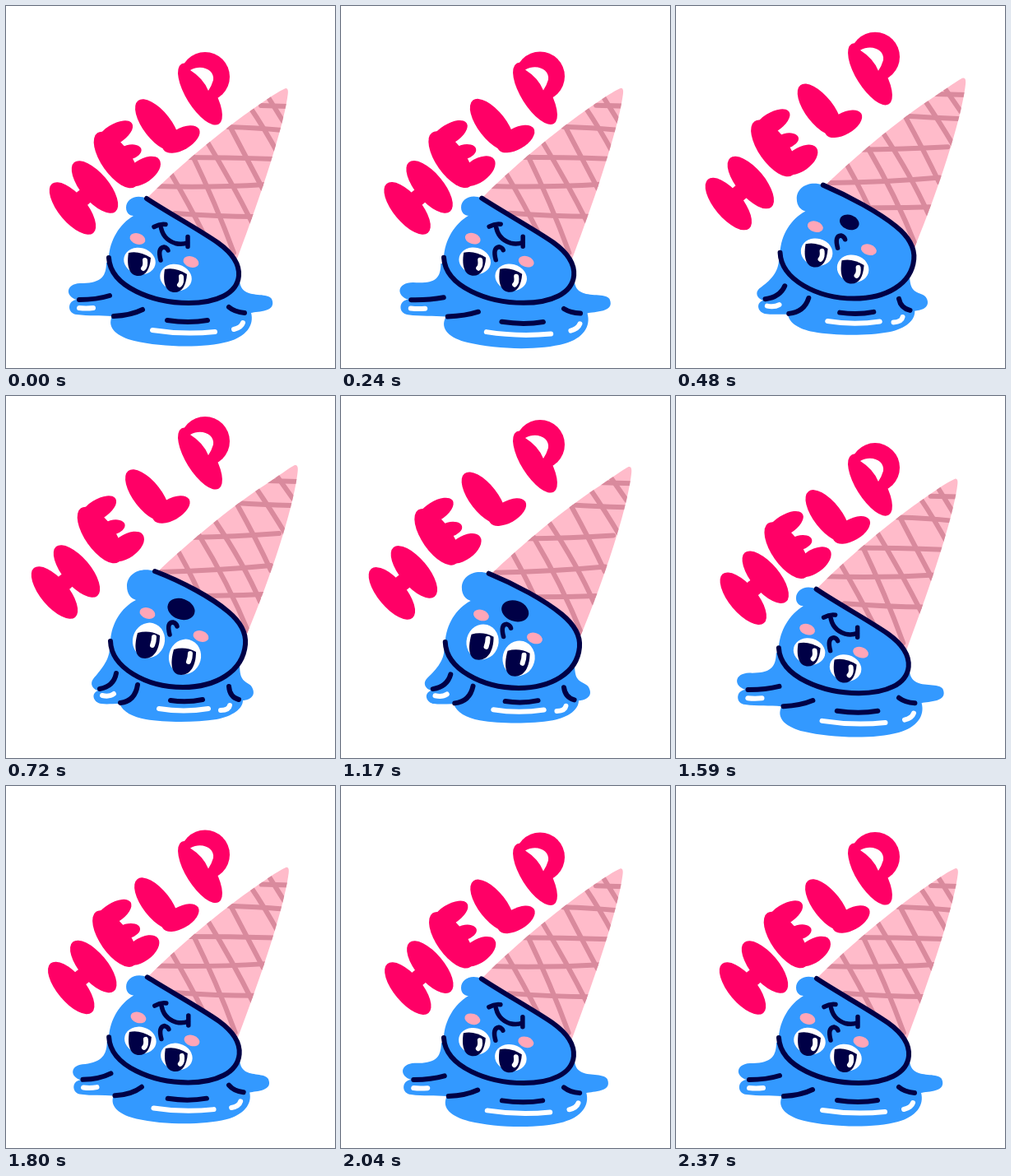
An HTML page with a canvas that plays this animation: 400x440 px, repeating every 2.4 s.

```html
<!DOCTYPE html>
<html>
<head>
<meta charset="utf-8">
<style>
html, body { margin: 0; width: 100%; height: 100%; overflow: hidden; background: #fff; }
canvas { display: block; }
</style>
</head>
<body>
<canvas id="stage" width="400" height="440"></canvas>
<script>
const ctx = document.getElementById('stage').getContext('2d');
const LOOP = 2400, STEP = 30;
const BLUE = '#3399ff', NAVY = '#000046', RED = '#ff0066', CONE = '#ffbbca',
      WAFFLE = '#d98a9d', CHEEK = '#ffa6b8', WHITE = '#ffffff';

// [time, value] keys: 0 = melted, 1 = stretched up
const bodyKeys = [[0, 0], [150, -.2], [480, .78], [720, 1], [800, 1.03], [1170, .87],
                  [1410, .47], [1620, -.08], [1800, .08], [2000, -.01], [2400, 0]];
const puddleKeys = [[0, 0], [150, -.4], [480, .78], [720, 1], [800, 1.03], [1170, .91],
                    [1410, .54], [1630, -.13], [1800, .18], [2000, -.02], [2400, 0]];
const scareKeys = [[0, 0], [480, .1], [640, 1], [1200, 1], [1400, .1], [1560, 0], [2400, 0]];

// Smooth curve through the keys, flat at both ends
function valueAt(keys, t) {
  const slope = i => i < 1 || i > keys.length - 2 ? 0
    : (keys[i + 1][1] - keys[i - 1][1]) / (keys[i + 1][0] - keys[i - 1][0]);
  let i = 0;
  while (i < keys.length - 2 && t >= keys[i + 1][0]) i++;
  const [t0, a] = keys[i], [t1, b] = keys[i + 1];
  const d = t1 - t0, u = (t - t0) / d, v = 1 - u;
  return v * v * (1 + 2 * u) * a + u * u * (3 - 2 * u) * b
    + d * u * v * (v * slope(i) - u * slope(i + 1));
}

const clamp = x => Math.max(0, Math.min(1, x));
const mix = (a, b, k) => a + (b - a) * k;

// Blend two path strings that share the same commands
function blend([from, to], k) {
  const target = to.match(/-?[\d.]+/g);
  let i = 0;
  return new Path2D(from.replace(/-?[\d.]+/g, n => mix(+n, +target[i++], k).toFixed(2)));
}

function fill(path, color) {
  ctx.fillStyle = color;
  ctx.fill(path);
}

function stroke(path, color, width) {
  ctx.strokeStyle = color;
  ctx.lineWidth = width;
  ctx.stroke(path);
}

function ellipse(x, y, rx, ry, degrees, color) {
  ctx.fillStyle = color;
  ctx.beginPath();
  ctx.ellipse(x, y, rx, ry, degrees * Math.PI / 180, 0, 7);
  ctx.fill();
}

function at(x, y, scale, draw) {
  ctx.save();
  ctx.translate(x, y);
  ctx.scale(scale, scale);
  draw();
  ctx.restore();
}

const puddle = [
  'M122 312 C122 332 112 337 90 337 C72 338 72 353 86 357 C74 358 74 374 86 375 C100 377 115 376 129 377 C122 392 136 402 156 407 C190 415 240 416 270 408 C292 402 302 388 298 373 C306 371 330 372 323 356 C318 349 300 353 291 347 C285 343 284 338 283 326 Z',
  'M126 306 C126 322 114 334 106 344 C101 351 107 357 112 358 C102 362 107 373 116 374 C122 375 130 374 138 374 C142 384 154 390 170 393 C194 397 230 397 256 393 C276 389 288 380 288 370 C294 370 304 366 300 356 C298 349 290 349 287 343 C284 338 284 330 284 318 Z'];
const folds = [
  'M89 357 Q110 357 126 352 M131 377 Q152 376 166 369 M196 382 Q222 386 245 382 M271 366 Q278 372 290 373',
  'M114 356 Q131 353 134 337 M139 373 Q157 371 160 351 M200 370 Q220 373 239 369 M271 353 Q272 366 283 369'];
const shine = [
  'M89 367 Q97 368 106 367 M178 394 Q216 400 254 396 M277 393 Q286 391 288 385',
  'M117 364 Q126 366 131 362 M186 380 Q216 385 246 380 M261 382 Q271 382 272 376'];
const head = [
  'M171 234 C158 228 146 235 146 245 C146 252 151 255 155 255 C138 265 126 285 125 306 C127 342 180 361 222 361 C255 361 281 350 283 328 C284 315 276 301 258 288 C235 272 195 250 171 234 Z',
  'M181 213 C162 207 147 217 147 231 C147 241 152 246 158 248 C140 257 128 277 127 298 C128 330 170 354 215 354 C255 354 288 335 291 302 C292 291 288 277 270 262 C250 245 215 226 181 213 Z'];
const rim = [
  'M171 234 C195 250 235 272 258 288 C276 301 284 315 283 328 C281 350 255 361 222 361 C180 361 127 342 125 306',
  'M181 213 C215 226 250 245 270 262 C288 277 292 291 291 302 C288 335 255 354 215 354 C170 354 128 330 127 298'];
const cone = [
  'M171 234 C215 190 270 145 315 115 C325 108 335 102 340 100 C344 100 343 106 342 112 C336 150 312 225 281 307 C272 298 262 290 258 288 C235 272 195 250 171 234 Z',
  'M184 214 C220 180 270 137 315 108 C330 98 345 87 351 84 C356 83 355 90 354 97 C348 140 322 220 293 289 C288 277 282 271 270 262 C250 245 215 226 184 214 Z'];
const rows = [
  'M310 121 L345 122 M270 147 Q305 148 336 151 M212 184 Q270 184 325 186 M180 219 Q250 221 315 217 M205 252 Q260 256 302 256',
  'M318 103 L358 104 M280 130 Q310 132 346 133 M222 172 Q280 171 332 167 M188 214 Q260 212 322 206 M215 243 Q265 243 312 241'];
const slants = [
  'M317 108 L338 142 M296 122 Q315 150 331 180 M270 142 Q295 190 312 222 M244 164 Q275 215 299 263 M226 180 Q255 240 277 300 M200 203 Q222 240 242 280',
  'M327 94 L349 125 M304 112 Q322 138 340 168 M280 130 Q305 175 322 212 M253 150 Q290 205 309 250 M234 168 Q272 230 298 295 M210 190 Q228 222 245 262'];
const nose = [
  'M188 309 Q184 294 192 293 Q196 294 197 297',
  'M199 290 Q195 275 203 275 Q207 276 208 280'];
const pupil = [
  'M-13 -12 Q0 -15 14 -6 C13 8 8 16 -1 16 C-11 16 -16 6 -13 -12 Z',
  'M-13 -10 Q1 -14 14 -7 C14 10 7 21 -4 21 C-16 21 -18 8 -13 -10 Z'];
const glint = ['M7 -3 Q8 4 5 7', 'M7 -5 Q7 0 5 5'];
const smile = new Path2D('M-16 -11 Q-14 6 2 11 Q10 13 17 10 M-24 -9 Q-17 -13 -10 -12 M17 3 L17 15');
const hole = new Path2D('M224 78 C238 70 254 78 252 90 Q250 97 246 103 Q240 88 224 78 Z');

// Each letter: its travel, then its blobs as [x, y, rx, ry, angle]
const letters = [
  [-22, -7, [[81, 246, 39, 17, 50], [108, 220, 39, 17, 50], [94, 233, 20, 10, -38]]],
  [-20, -18, [[134, 187, 40, 18, 55], [132, 156, 25, 12, -32], [149, 178, 16, 9, -15], [166, 201, 25, 14, -35]]],
  [-12, -24, [[184, 145, 38, 17, 52], [213, 162, 25, 13, -30]]],
  [0, -31, [[236, 107, 43, 17, 58], [242, 86, 30, 30, 0]]]
];

function drawText(p) {
  letters.forEach(([dx, dy, blobs], i) => at(dx * p, dy * p, 1, () => {
    blobs.forEach(b => ellipse(...b, RED));
    if (i === 3) fill(hole, WHITE);
  }));
}

function drawCone(p) {
  const shape = blend(cone, p);
  fill(shape, CONE);
  ctx.save();
  ctx.clip(shape);
  stroke(blend(rows, p), WAFFLE, 6);
  stroke(blend(slants, p), WAFFLE, 6);
  ctx.restore();
}

function drawFace(p, scare) {
  for (const [x, y] of [[160, 283], [225, 311]])
    ellipse(x + 12 * p, y - 19 * p, 9.7, 6.5, 18, CHEEK);

  for (const [x, y] of [[162, 312], [206, 332]])
    at(x + 11 * p, y - 14 * p, 1, () => {
      ellipse(.5, mix(-2, -1, scare), 19.5, mix(16, 21.5, scare), 15, WHITE);
      fill(blend(pupil, scare), NAVY);
      stroke(blend(glint, scare), WHITE, 6);
    });

  stroke(blend(nose, p), NAVY, 5.5);

  const x = 203 + 10 * p, y = 277 - 18 * p;
  if (p < .28) {
    at(x + 1, y + .5, 1 - .6 * clamp((p - .1) / .18), () => stroke(smile, NAVY, 5.5));
  } else {
    const size = mix(.68, 1, scare) * mix(.6, 1, clamp((p - .28) / .17));
    ellipse(x, y, 17 * size, 12.5 * size, 20, NAVY);
  }
}

function draw(t) {
  const p = valueAt(bodyKeys, t), q = valueAt(puddleKeys, t), scare = clamp(valueAt(scareKeys, t));
  ctx.fillStyle = WHITE;
  ctx.fillRect(0, 0, 400, 440);
  ctx.lineCap = ctx.lineJoin = 'round';
  fill(blend(puddle, q), BLUE);
  stroke(blend(shine, q), WHITE, 6);
  stroke(blend(folds, q), NAVY, 6);
  fill(blend(head, p), BLUE);
  drawCone(p);
  stroke(blend(rim, p), NAVY, 6);
  drawFace(p, scare);
  drawText(p);
}

const start = performance.now();
function tick() {
  const t = (performance.now() - start) % LOOP;
  draw(Math.floor(t / STEP) * STEP);
  requestAnimationFrame(tick);
}
tick();
</script>
</body>
</html>
```
